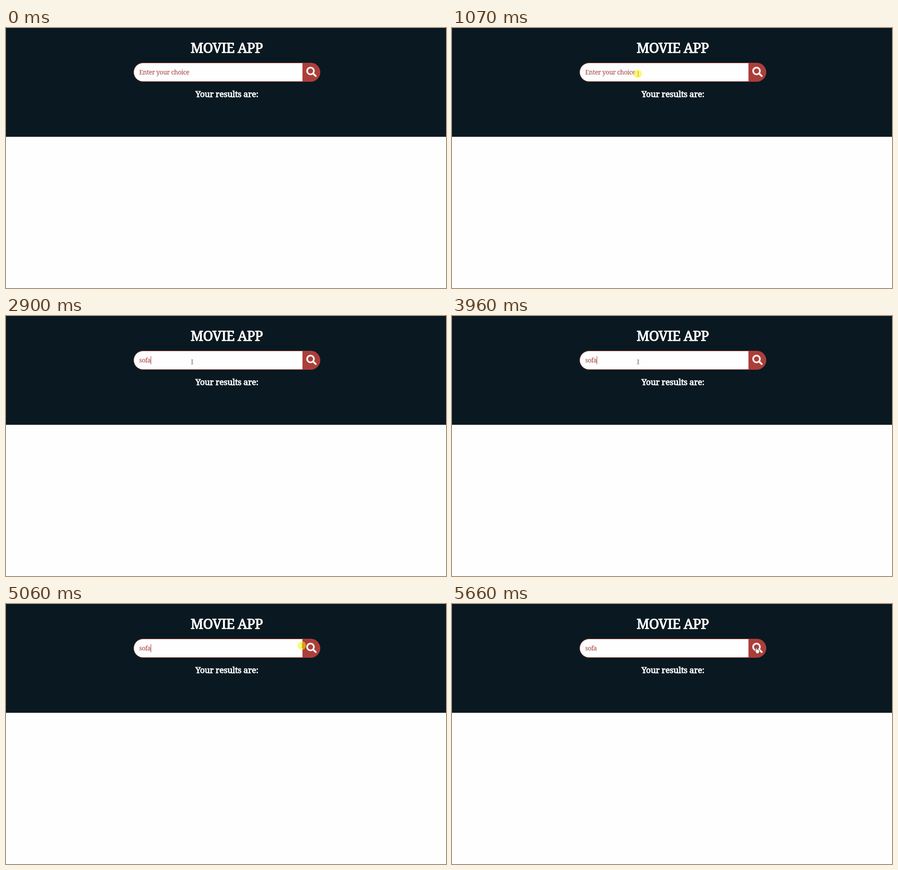
Animation of 973 by 576 pixels, one loop 8 s. Source, as an HTML page:

```html
<!DOCTYPE html>
<html lang="en">
<head>
<meta charset="utf-8">
<title>Movie app</title>
<style>
  html, body { margin: 0; width: 100%; height: 100%; overflow: hidden; background: #fefefe; }
  svg { display: block; width: 973px; height: 576px; }
  text { font-family: "Roboto Slab", "Noto Serif", serif; white-space: pre; }
  .head { fill: #fff; stroke: #fff; text-anchor: middle; }
  #title { font-size: 30px; letter-spacing: -.6px; stroke-width: 1.2px; }
  #results { font-size: 18.4px; letter-spacing: -.28px; stroke-width: .9px; }
  #entry { font-size: 13.8px; letter-spacing: -.34px; fill: #a33a38; }
</style>
</head>
<body>
<svg viewBox="0 0 973 576">
  <rect width="973" height="576" fill="#fefefe"/>
  <rect width="973" height="241" fill="#0a1921"/>
  <text id="title" class="head" x="488" y="55">MOVIE APP</text>
  <path d="M656 77.5H303a20.5 20.5 0 0 0 0 41H656z" fill="#fefefe" stroke="#b5524c"/>
  <path d="M656 77H674a21 21 0 0 1 0 42H656z" fill="#ac3e39"/>
  <g fill="none" stroke="#f6f2f8">
    <circle cx="673.4" cy="95.2" r="7.5" stroke-width="3.7"/>
    <path d="M679.5 101.3L684.8 106.2" stroke-width="4.2" stroke-linecap="round"/>
  </g>
  <text id="entry" x="294.6" y="103.3"></text>
  <rect id="caret" y="89" width="1" height="18" fill="#a33a38"/>
  <text id="results" class="head" x="488.6" y="153">Your results are:</text>
  <g id="pointer">
    <path id="beam" d="M-1 -4.7H.4M1.6 -4.7H3M1 -4.2V4.2M-1 4.7H.4M1.6 4.7H3" fill="none" stroke="#333"/>
    <path id="arrow" d="M0 0V10.6L2.4 8.4L4.1 12.2L6 11.4L4.4 7.6H7.4Z" fill="#fff" stroke="#111" stroke-width=".7"/>
    <path id="hand" d="M-1.2 .9Q0 -.6 1.2 .9V4.7Q2.5 4 3.2 5.1Q4.5 4.6 5.1 5.7Q6.8 5.5 6.8 7V10.3L5.6 12V14H-.3V12.2L-3 8.8Q-3.2 7.2 -1.8 7.6L-1.2 8.3Z" fill="#fff" stroke="#222" stroke-width=".8"/>
    <circle id="click" r="9.4" fill="#fff200" fill-opacity=".52"/>
  </g>
</svg>
<script>
const LOOP = 8000, STEP = 68, BLINK = 530;
const WORD = "sofa", HINT = "Enter your choice";
const TYPE_START = 2090, TYPE_GAP = 270;
const FOCUS = 1090, BLUR = 5600;
const CLICK_FIELD = 1070, CLICK_EDGE = 5060;

// Each move eases along a Bezier curve through its control points.
const moves = [
  { start: 260, end: 1000, path: [[868, 525], [410.6, 101.7]] },
  { start: 4220, end: 4290, path: [[410.6, 101.7], [414, 101]] },
  { start: 4440, end: 5044, path: [[414, 101], [773, 174], [871, 284], [654, 92]] },
  { start: 5260, end: 5660, path: [[654, 92], [673, 96]] }
];

const $ = id => document.getElementById(id);
const show = (id, on) => { $(id).style.display = on ? "" : "none"; };
const mix = (a, b, u) => a.map((v, i) => v + (b[i] - v) * u);
const easeOut = f => 1 - (1 - f) ** 2;

function bezier(points, u) {
  if (points.length === 1) return points[0];
  return bezier(points.slice(1).map((p, i) => mix(points[i], p, u)), u);
}

function pointerAt(t) {
  const move = moves.filter(m => t >= m.start).pop();
  if (!move) return null;
  const { start, end, path } = move;
  const stepped = Math.floor((t - start) / STEP) * STEP;
  const f = t >= end ? 1 : stepped / (end - start);
  return bezier(path, easeOut(f));
}

function shapeAt([x, y]) {
  if (y < 77 || y > 119 || x < 282 || x > 695) return "arrow";
  return x < 656 ? "beam" : "hand";
}

function typedAt(t) {
  const count = Math.floor((t - TYPE_START) / TYPE_GAP) + 1;
  return Math.max(0, Math.min(WORD.length, count));
}

// Focus, every key press and the second click restart the blink.
function caretVisible(t, typed) {
  if (t < FOCUS || t >= BLUR) return false;
  let reset = typed ? TYPE_START + (typed - 1) * TYPE_GAP : FOCUS;
  if (t >= CLICK_EDGE) reset = CLICK_EDGE;
  return Math.floor((t - reset) / BLINK) % 2 === 0;
}

function drawField(t) {
  const typed = typedAt(t);
  const entry = $("entry");
  entry.textContent = typed ? WORD.slice(0, typed) : HINT;
  const end = typed ? entry.getComputedTextLength() : 0;
  $("caret").setAttribute("x", Math.round(294.6 + end));
  show("caret", caretVisible(t, typed));
}

function drawPointer(t) {
  const pos = pointerAt(t);
  show("pointer", pos);
  if (!pos) return;
  $("pointer").setAttribute("transform", `translate(${pos})`);
  const shape = shapeAt(pos);
  for (const id of ["beam", "arrow", "hand"]) show(id, id === shape);
  const pressed = (at, hold) => t >= at && t < at + hold;
  show("click", pressed(CLICK_FIELD, 140) || pressed(CLICK_EDGE, 200));
}

function tick() {
  const t = performance.now() % LOOP;
  drawField(t);
  drawPointer(t);
  requestAnimationFrame(tick);
}
tick();
</script>
</body>
</html>
```
